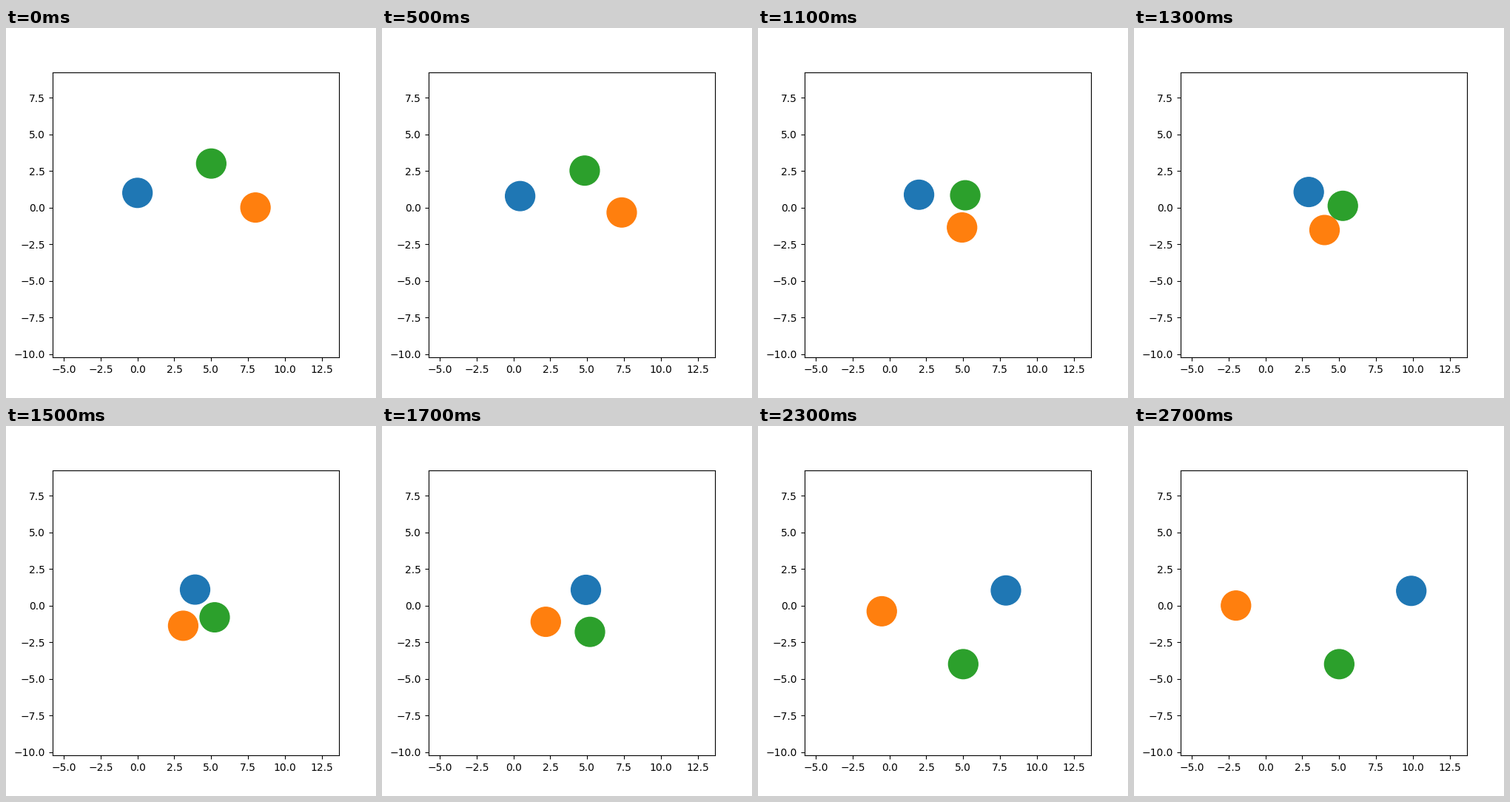
Animation, 500 px wide and 500 px high, one loop 2900 ms. Source, as a matplotlib script:

```python
import numpy as np
import matplotlib.pyplot as plt
from matplotlib.animation import FuncAnimation

SPAN = 19.44
CENTER = np.array([3.9425, -0.5])
STEPS = 12
TICK = 100          # ms per drawn frame
HOLD, PACE = 5, 2   # frames for the start pose, then for every step
KEYS = np.array([0, 1, 3, 5, 7])  # steps at which the swerve is pinned

# Each agent: key points of its swerve, goal, cruising speed per step
AGENTS = [
    ([(0, 1), (.45, .78), (1.22, .7), (2.935, 1.06), (4.908, 1.07)],
     (10, 1), .9955),
    ([(8, 0), (7.34, -.338), (5.8, -1.045), (4.005, -1.535), (2.19, -1.11)],
     (-2, 0), .935),
    ([(5, 3), (4.83, 2.52), (5, 1.45), (5.245, .116), (5.184, -1.798)],
     (5, -4), .98),
]


def smooth(points, t):
    """Cubic Hermite curve through points at KEYS, evaluated at t."""
    p = np.array(points, float)
    m = np.gradient(p, KEYS, axis=0)
    k = min(np.searchsorted(KEYS, t, side="right") - 1, len(KEYS) - 2)
    h = KEYS[k + 1] - KEYS[k]
    u = (t - KEYS[k]) / h
    ease = u * u * (3 - 2 * u)
    return (p[k] + (p[k + 1] - p[k]) * ease
            + h * u * (1 - u) * (m[k] * (1 - u) - m[k + 1] * u))


def position(agent, step):
    """Swerve around the others, then run straight and stop at the goal."""
    points, goal, speed = agent
    last = KEYS[-1]
    if step <= last:
        return smooth(points, step)
    start = np.array(points[-1])
    way = np.array(goal) - start
    return start + way * min(1, speed * (step - last) / np.hypot(*way))


fig, ax = plt.subplots(figsize=(5, 5), dpi=100)
ax.set_xlim(CENTER[0] - SPAN / 2, CENTER[0] + SPAN / 2)
ax.set_ylim(CENTER[1] - SPAN / 2, CENTER[1] + SPAN / 2)
discs = [ax.add_patch(plt.Circle(position(agent, 0), 1, color=f"C{n}"))
         for n, agent in enumerate(AGENTS)]


def update(i):
    step = max(0, (i - HOLD) // PACE + 1)
    for disc, agent in zip(discs, AGENTS):
        disc.center = position(agent, step)
    return discs


anim = FuncAnimation(fig, update, frames=HOLD + PACE * STEPS, interval=TICK,
                     repeat=True, repeat_delay=0)
plt.show()
```
